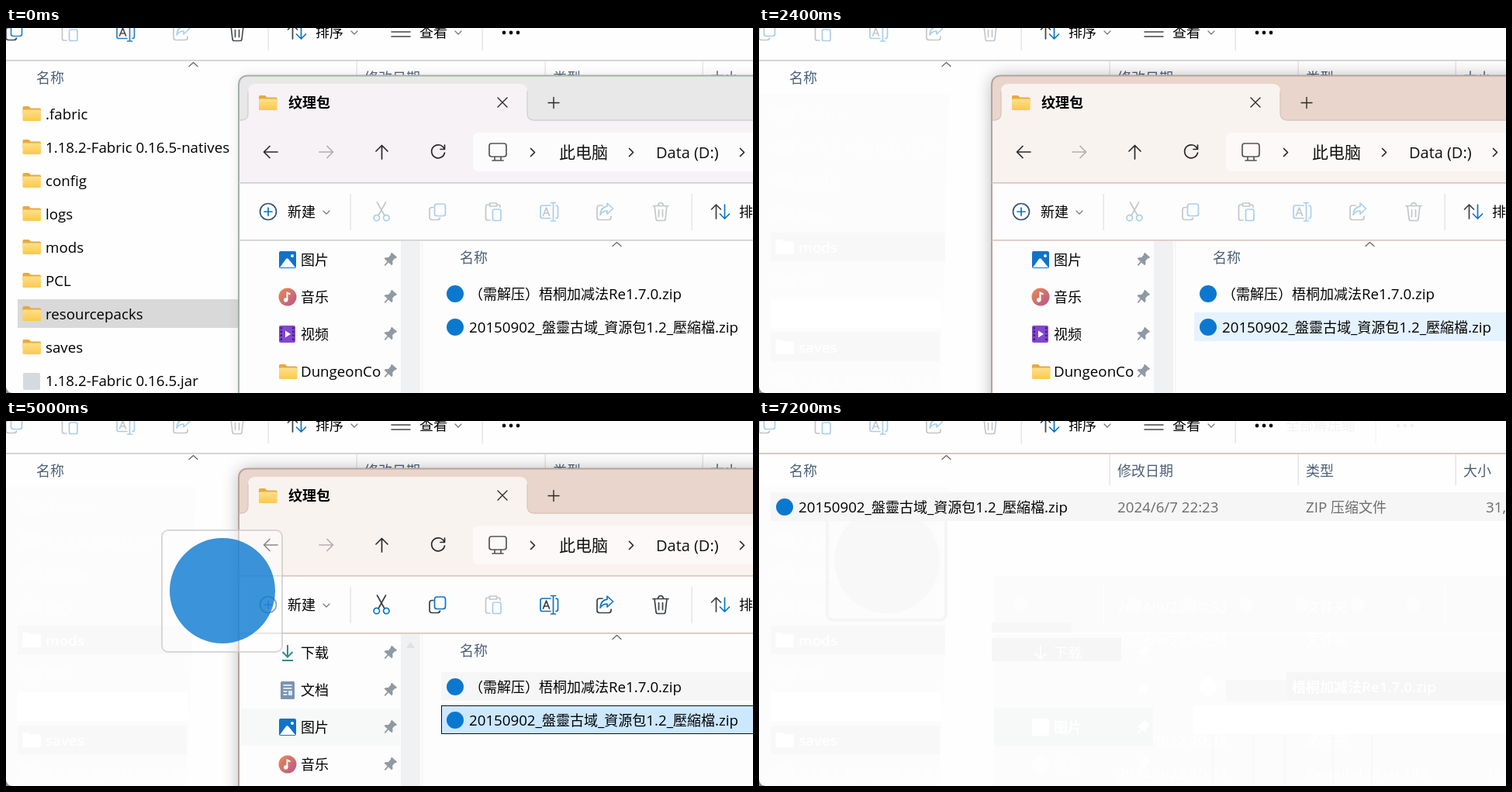
Write an HTML page that moves like this. It is 963 px wide and 471 px high and loops after 8300 ms.

```html
<!DOCTYPE html>
<html lang="zh-CN">
<head>
<meta charset="utf-8">
<title>资源包安装</title>
<style>
html, body { margin: 0; width: 100%; height: 100%; overflow: hidden; background: #fefefe; }
svg { display: block; width: 963px; height: 471px; }
text { font-family: "Open Sans", "Noto Sans CJK SC", "Noto Sans CJK", sans-serif; white-space: pre; }
.ln { fill: none; stroke-width: 1.7; stroke-linecap: round; stroke-linejoin: round; }
.pale { --b: #a9cfec; --d: #c3c7ca; --s: #a9cfec; --sd: #c3c7ca; }
.folder { --b: #2b84c6; --d: #4a4f54; --s: #a9cfec; --sd: #c3c7ca; }
.full { --b: #0d74c4; --d: #3c4045; --s: #0d74c4; --sd: #3c4045; }
.b { stroke: var(--b); }
.d { stroke: var(--d); }
.s { stroke: var(--s); }
.k { stroke: #2a2a2a; }
.slide { animation: slide 8300ms infinite step-end; }
@keyframes slide {
  0% { transform: translateY(0); }
  44.578% { transform: translateY(18px); }
  45.783% { transform: translateY(38px); }
  46.988% { transform: translateY(48px); }
  56.627% { transform: translateY(76px); }
  57.831%, 100% { transform: translateY(96px); }
}
.shade { animation: shade 8300ms infinite linear; }
@keyframes shade {
  0%, 22.89% { opacity: 0; }
  26.506%, 100% { opacity: .28; }
}
</style>
</head>
<body>
<svg id="stage" viewBox="0 0 963 471"></svg>
<script>
const LOOP = 8300;
const INK = '#000', HEAD = '#4c607a', GREY = '#6d6d6d';
const HOVER = '#e5f3ff', PICK = '#cce8ff', REST = '#f6f6f6';

const T = (x, y, s, fill = INK, size = 18, more = '') =>
  `<text x="${x}" y="${y}" fill="${fill}" font-size="${size}" ${more}>` +
  s.replace(/[ -~]+/g, m => `<tspan font-size="1.04em">${m}</tspan>`) + '</text>';
const box = (x, y, w, h, fill, more = '') =>
  `<rect x="${x}" y="${y}" width="${w}" height="${h}" fill="${fill}" ${more}/>`;
const ln = (cls, d, more = '') => `<path class="ln ${cls}" d="${d}" ${more}/>`;
const use = (id, x, y, more = '') => `<use href="#${id}" x="${x}" y="${y}" ${more}/>`;
const on = (spans, body) => `<g data-on="${spans}">${body}</g>`;
const dot = (x, y, r, fill) => `<circle cx="${x}" cy="${y}" r="${r}" fill="${fill}"/>`;
const dots = (x, y, fill) => [-9, 0, 9].map(d => dot(x + d, y, 2.4, fill)).join('');
const vline = (x, y1, y2, c = '#e2e2e4') => box(x - .5, y1, 1.3, y2 - y1, c);
const caret = (x, y) => ln('', `M${x - 5} ${y + 2.5}l5.500 -5 5.500 5`, 'stroke="#666" style="stroke-width:1.2"');
const chev = (x, y) => ln('', `M${x - 4} ${y - 2}l4 4 4 -4`, 'stroke="#777" style="stroke-width:1.2"');
const frame = (x, y, w) => box(x + .5, y + .5, w, 36, PICK, 'stroke="#111"');

const defs = `<defs>
<filter id="blur1" x="-10%" y="-10%" width="120%" height="120%"><feGaussianBlur stdDeviation="7"/></filter>
<filter id="blur2" x="-10%" y="-10%" width="120%" height="120%"><feGaussianBlur stdDeviation="11"/></filter>
<linearGradient id="gold" x2="0" y2="1"><stop stop-color="#ffe08a"/><stop offset="1" stop-color="#fbc84c"/></linearGradient>
<linearGradient id="tune" x2="1" y2="1"><stop stop-color="#e98b52"/><stop offset="1" stop-color="#b8558c"/></linearGradient>
<clipPath id="side"><rect x="301" y="275" width="208" height="200"/></clipPath>
<g id="folder">
  <path d="M0 1.500Q0 0 1.500 0H8l2.500 2.500H22Q23.500 2.500 23.500 4V10H0z" fill="#e8a93f"/>
  <rect y="4.500" width="23.500" height="14.500" rx="1.500" fill="url(#gold)"/>
</g>
<path id="blank" d="M0 1.500Q0 0 1.500 0H8l2.500 2.500H22Q23.500 2.500 23.500 4V19H0z" fill="#fff"/>
<g id="zip">${dot(0, 0, 11, '#0b78d0')}</g>
<g id="pin" transform="rotate(42)"><path d="M-4.500 -8.500H4.500V-6.500L3.500 -5.500V-1L6.500 2V4H.9V10H-.9V4H-6.500V2L-3.500 -1V-5.500L-4.500 -6.500z" fill="#8f9aa3"/></g>
<g id="docs"><rect x="2" width="18" height="23" rx="1.500" fill="#7894b4"/>
  <path d="M5.500 5h11M5.500 9h11M5.500 13h5M5.500 17h5" stroke="#fff" stroke-width="1.500"/><rect x="12" y="12" width="5" height="6" fill="#dce6f0"/></g>
<g id="pics"><rect width="22" height="22" rx="2" fill="#1272c8"/><path d="M1 21L9 10Q10.500 8.500 12 10L21 21z" fill="#fff"/><circle cx="17" cy="6" r="2" fill="#fff"/></g>
<g id="music"><circle cx="11" cy="11" r="11.500" fill="url(#tune)"/><path d="M10.500 15V5.500l4 2" fill="none" stroke="#fff" stroke-width="2"/><circle cx="8.700" cy="15" r="2.700" fill="#fff"/></g>
<g id="video"><rect width="21" height="22" rx="2" fill="#8246cf"/><path d="M2.800 2V21M18.200 2V21" stroke="#3f1a80" stroke-width="2.400" stroke-dasharray="2.500 2.300"/><path d="M8 6.500L15 11l-7 4.500z" fill="#fff"/></g>
<g id="down"><path d="M11 1V16M4.500 10L11 16.500 17.500 10M4 21H18" fill="none" stroke="#2f8f86" stroke-width="2"/></g>
<g id="tools">
  ${ln('d', 'M478.500 225L488 242M489.500 225L480 242')}
  ${ln('b', 'M481.500 245a3.700 3.700 0 1 1-7.400 0a3.700 3.700 0 1 1 7.400 0M494 245a3.700 3.700 0 1 1-7.400 0a3.700 3.700 0 1 1 7.400 0')}
  ${ln('d', 'M551 231.500H549Q546 231.500 546 234.500V244Q546 247.500 549.500 247.500H556Q559 247.500 559.500 245')}
  ${ln('b', 'M555.500 227H563.500Q566.500 227 566.500 230V239.500Q566.500 242.500 563.500 242.500H555.500Q552.500 242.500 552.500 239.500V230Q552.500 227 555.500 227z')}
  <g class="pale">${ln('d', 'M623 228H621Q618.500 228 618.500 230.500V245.500Q618.500 248 621 248H624M633 228H635Q637 228 637 230V231M623.500 226H632.500V230H623.500z')}
  ${ln('b', 'M629.500 234H636Q638 234 638 236V246.500Q638 248.500 636 248.500H629.500Q627.500 248.500 627.500 246.500V236Q627.500 234 629.500 234z')}</g>
  ${ln('b', 'M702 229H691.500Q689 229 689 231.500V243Q689 245.500 691.500 245.500H702M709 229Q711.500 229 711.500 231.500V243Q711.500 245.500 709 245.500')}
  ${ln('d', 'M692.500 242L696.500 232 700.500 242M694 239H699')}
  ${ln('b', 'M705.500 226V248.500M702.500 225.500H708.500M702.500 249H708.500')}
  ${ln('', 'M769 229H765Q762 229 762 232V244.500Q762 247.500 765 247.500H777Q780 247.500 780 244.500V243', 'style="stroke:var(--sd)"')}
  ${ln('s', 'M775 226L782.500 233 775 240V236Q769 236 766 241Q767 231 775 230.200z')}
  ${ln('d', 'M834 229.500H854M836 229.500L838 246.500Q838.300 248.500 840 248.500H848Q849.700 248.500 850 246.500L852 229.500M840.500 229Q841 225.500 844 225.500T847.500 229M841.500 234.500V243.500M846.500 234.500V243.500')}
  ${vline(884, 214, 261)}
  ${ln('', 'M915.500 246V228M909.500 234L915.500 228 921.500 234', 'stroke="#3c4045"')}
  ${ln('', 'M926.500 228V246M920.500 240L926.500 246 932.500 240', 'stroke="#0d74c4"')}
  ${T(945, 244, '排序')}${chev(995, 238)}
  ${ln('', 'M1043 231H1067M1043 237H1067M1043 243H1067', 'stroke="#444" style="stroke-width:1.5"')}
  ${T(1079, 244, '查看')}${chev(1129, 238)}${vline(1160, 214, 261)}
</g>
<g id="drag">
  ${box(1, 1, 155, 157, '#fff', 'rx="8" fill-opacity=".45" stroke="#c8c8c8" stroke-opacity=".7" stroke-width="2"')}
  <circle cx="79" cy="79" r="68" fill="#0b78d0" opacity=".8"/>
</g>
</defs>`;

// Background window
const names = ['.fabric', '1.18.2-Fabric 0.16.5-natives', 'config', 'logs', 'mods', 'PCL', 'resourcepacks', 'saves', '1.18.2-Fabric 0.16.5.jar'];
const jar = names.length - 1;
const rowTop = i => 92 + 43 * i;
const bar = (i, fill, x2 = 963) => box(15, rowTop(i), x2 - 15, 37, fill);
const details = (i, fill) => {
  const y = 118 + 43 * i;
  return T(462, y, '2024/9/22 20:3' + (i % 5), fill) +
    T(705, y, i < jar ? '文件夹' : 'Executable Jar File', fill) +
    (i < jar ? '' : T(937, y, '19,204 KB', fill));
};

const listing = names.map((n, i) => {
  const y = 101 + 43 * i;
  return (i < jar ? use('folder', 21.5, y) : box(22, y, 22, 22, '#d5dae0', 'rx="2"')) +
    T(51, y + 17, n) + details(i, GREY);
}).join('');

const files = on('0-1300',
  on('300-400', bar(4, HOVER)) + on('400-1300', bar(4, REST)) +
  on('400-500', bar(5, HOVER)) +
  on('0-500 600-900', bar(6, '#d9d9d9')) + on('500-600', bar(6, PICK)) +
  on('900-1300', frame(15, rowTop(6), 960)) +
  on('600-900', bar(7, HOVER)) + on('900-1300', bar(7, REST)) + listing);

// Faint marks that stay on the cleared list
const trace = on('1300-8300',
  '<path d="M0 85H246Q240 150 240 300L232 471H0z" fill="#fcfcfc"/>' +
  bar(4, '#f8f8f8', 240) + bar(6, '#fff', 235) + bar(7, '#f8f8f8', 233) +
  names.map((n, i) => i === 6 ? '' : `<g opacity="${i === 4 || i === 7 ? 1 : .6}">` + use('blank', 21.5, rowTop(i) + 9) +
    T(51, rowTop(i) + 26, n.slice(0, 22), '#fff', 18, 'font-weight="600"') + '</g>').join(''));

const trace2 = on('5300-8300',
  box(303, 200, 660, 271, '#fcfcfc') + box(303, 200, 660, 73, '#fbfbfb') +
  [3, 4, 7, 8].map(i => details(i, '#fff')).join('') +
  '<rect x="88" y="103" width="153" height="154" rx="8" fill="none" stroke="#f5f5f5" stroke-width="4"/>' + dot(165, 180, 68, '#f8f8f8') +
  [338, 484, 556, 628, 700, 772, 844].map(x => dot(x, 237, 9, '#fdfdfd')).join('') +
  vline(444, 214, 261, '#fff') + vline(884, 214, 261, '#fff') + box(300, 273, 663, 2, '#fff') +
  box(300, 260, 103, 13, '#f7f7f7') + box(300, 280, 167, 30, '#f6f6f6') +
  ln('', 'M363 290V306M356 300l7 7 7-7', 'stroke="#fff" style="stroke-width:2"') + T(380, 306, '下载', '#fff') +
  box(303, 371, 205, 48, '#f6f9f8') + box(352, 384, 22, 22, '#fff') + T(380, 402, '图片', '#fff', 18, 'font-weight="700"') +
  dot(363, 443, 11, '#fefefe') + T(380, 450, '音乐', '#fefefe') +
  [299, 347, 395, 443].map(y => `<g transform="translate(495 ${y}) rotate(42)"><path d="M-4.500 -8H4.500V-1L6.500 3H.9V10H-.9V3H-6.500L-4.500 -1z" fill="#fff"/></g>`).join('') +
  box(680, 324, 283, 37, '#f6f6f6') + T(687, 350, '梧桐加减法Re1.7.0.zip', '#fff', 18, 'font-weight="600"') +
  dot(579, 343, 11, '#fff') + box(602, 334, 78, 28, '#f8f8f8') + box(560, 367, 403, 37, '#fff') +
  [585, 637, 678, 740, 790].map(x => vline(x, 404, 471, '#f5f5f5')).join(''));

const heads = on('6800-7200', box(696, 43, 203, 40, HOVER)) +
  T(39, 71, '名称', HEAD) + T(462, 71, '修改日期', HEAD) + T(705, 71, '类型', HEAD) + T(908, 71, '大小', HEAD) +
  caret(241, 47) + [452, 695, 898].map(x => vline(x, 43, 83)).join('');

const toolsAt = (cls, x = 0, y = 0) => use('tools', x, y, `class="${cls}"`);
const topBar =
  on('0-1300', toolsAt('folder', -546, -232)) +
  on('1300-5500 6300-8300', toolsAt('pale', -546, -232)) +
  on('5500-6300', toolsAt('full', -546, -232) + use('folder', 640, -5) + T(679, 12, '全部解压缩') + vline(795, 0, 29) + dots(833, 6, '#222')) +
  on('6300-8300', T(679, 12, '全部解压缩', '#f2f2f2') + vline(795, 0, 29, '#f4f4f4') + dots(833, 6, '#f2f2f2')) +
  on('0-5500 6300-8300', dots(651, 6, '#111')) +
  box(0, 41, 963, 1.7, '#d0cfcf') + on('6300-8300', box(0, 41, 963, 1.7, '#d9c5bd'));

const copied = on('5400-8300',
  on('5400-6300', bar(0, PICK)) + on('6700-6800', bar(0, HOVER)) + on('6300-6700 6800-8300', bar(0, REST)) +
  use('zip', 33, 111) + T(51, 118, '20150902_盤靈古域_資源包1.2_壓縮檔.zip') +
  T(462, 118, '2024/6/7 22:23', GREY) + T(705, 118, 'ZIP 压缩文件', GREY) + T(937, 118, '31,482 KB', GREY));

const back = box(0, 0, 963, 471, '#fefefe') + trace + trace2 + files + topBar + heads +
  on('1400-5400', T(603, 125, '此文件夹为空。', GREY)) + copied +
  '<path d="M0 463Q1 470 8 471H0z" fill="#8c8c8c"/>';

// Foreground window
const chrome = (edge, title, nav, field, rule) =>
  `<path d="M300 480V74Q300 61.500 312.500 61.500H980V480z" fill="${title}" stroke="${edge}" stroke-width="2"/>` +
  `<path d="M301 119H303Q312 119 312 110V82Q312 72 322 72H662Q672 72 672 82V110Q672 119 681 119H980V200H301z" fill="${nav}"/>` +
  ln('', 'M301 119H303Q312 119 312 110V82M672 82V110Q672 119 681 119H963', `stroke="${rule}" style="stroke-width:1.3"`) +
  box(602, 135, 400, 50, field, 'rx="7"') + box(301, 200, 670, 275, '#fdfdfd') +
  box(300, 199, 663, 1.7, rule) + box(300, 273, 663, 1.7, rule);

const navBar =
  use('folder', 326, 87) + T(364, 103, '纹理包', INK, 18, 'font-weight="700"') +
  ln('k', 'M634 90L646 102M646 90L634 102M699 96.500H713M706 89.500V103.500', 'style="stroke-width:1.4"') +
  ln('k', 'M350 160H333M340 152.500L332.500 160 340 167.500M484.500 169V152M477 159L484.500 151.500 492 159M565 156A8.500 8.500 0 1 0 565.500 161M565.500 151V156.500H560') +
  ln('', 'M404 160H421M414 152.500L421.500 160 414 167.500', 'stroke="#aeb0ae"') +
  ln('', 'M626 149H642Q645 149 645 152V163Q645 166 642 166H626Q623 166 623 163V152Q623 149 626 149zM630 166V171M638 166V171M627 171H641', 'stroke="#555"') +
  [679, 806, 949].map(x => ln('k', `M${x - 2.5} 155.500l5 5-5 5`)).join('') +
  T(713, 168, '此电脑', '#111', 21) + T(838, 168, 'Data (D:)', '#111', 19.2);

const newBtn = `<circle class="ln" cx="338" cy="237" r="10.500" stroke="#35556f"/>` +
  ln('', 'M333 237H343M338 232V242', 'stroke="#0d74c4"') + T(363, 244, '新建') + chev(413, 238) + vline(444, 214, 261);

const places = [['down', '下载'], ['docs', '文档'], ['pics', '图片'], ['music', '音乐'], ['video', '视频'], ['folder', 'DungeonCo']];
const sidebar = '<g clip-path="url(#side)">' +
  on('3000-3100', box(303, 371, 205, 48, HOVER)) + on('3100-5300', box(303, 371, 205, 48, '#f7f9f9')) +
  '<g class="slide">' + places.map(([id, name], i) => {
    const y = 203 + 48 * i;
    return use(id, 352, y - 11 + (id === 'folder' ? 2 : 0)) + T(380, y + 7, name) +
      `<g transform="translate(495 ${y})">${use('pin', 0, 0)}</g>`;
  }).join('') + '</g></g>' +
  box(509, 275, 25, 200, '#f0f1f3') + on('2800-5300', '<path d="M516 293L521.500 285 527 293z" fill="#e0e1e3"/>') +
  vline(536.5, 275, 471, '#f3f3f3');

const first = c => box(561, 324, 410, 37, c), second = c => box(561, 367, 410, 37, c);
const packs = T(585, 303, '名称', HEAD) + caret(787, 279) +
  on('2500-2800', first(HOVER)) + on('2800-4600', frame(561, 324, 410)) + on('4600-5300', first(REST)) +
  on('2400-2500 3100-3300 4400-4600', second(HOVER)) + on('2500-3100 3300-4400', second(REST)) +
  on('4600-5300', frame(561, 367, 410)) +
  use('zip', 579, 343) + T(597, 350, '（需解压）梧桐加减法Re1.7.0.zip') +
  use('zip', 579, 386) + T(597, 393, '20150902_盤靈古域_資源包1.2_壓縮檔.zip');

const front = on('0-1100 1900-5300',
  on('0-1100', box(300, 62, 800, 600, '#8a6a92', 'rx="12" opacity=".22" filter="url(#blur1)"')) +
  box(300, 62, 800, 600, '#000', 'rx="12" class="shade" filter="url(#blur2)"') +
  on('0-1100', chrome('#a6b0a6', '#e7e8e7', '#f6f2f6', '#fdfcfd', '#cfd1cf')) +
  on('1900-5300', chrome('#b3a49d', '#e9d5cb', '#f9f3f0', '#fcf9f8', '#d8c6bd')) +
  navBar + newBtn +
  on('0-2800', toolsAt('pale')) + on('2800-5300', toolsAt('full')) +
  sidebar + packs);

const dragged = on('3700-4200 4700-5300', '<g id="mover">' + use('drag', 0, 0) + '</g>');

const stage = document.getElementById('stage');
stage.innerHTML = defs + back + front + dragged;

const opts = { duration: LOOP, iterations: Infinity };
const step = (t, props) => ({ offset: t / LOOP, easing: 'step-end', ...props });

for (const el of stage.querySelectorAll('[data-on]')) {
  const spans = el.dataset.on.split(' ').map(s => s.split('-').map(Number));
  const times = [...new Set([0, ...spans.flat(), LOOP])].sort((a, b) => a - b);
  const shown = t => spans.some(([a, b]) => t >= a && t < b);
  el.animate(times.map(t => step(t, { opacity: shown(t) ? 1 : 0 })), opts);
}

const path = [[0, 632, 287], [3800, 610, 300], [3900, 581, 318], [4100, 523, 318], [4700, 534, 226],
  [4800, 430, 205], [4900, 310, 175], [5000, 200, 140], [5100, 120, 112], [5200, 86, 101], [LOOP, 86, 101]];
document.getElementById('mover').animate(
  path.map(([t, x, y]) => step(t, { transform: `translate(${x}px, ${y}px)` })), opts);
</script>
</body>
</html>
```
